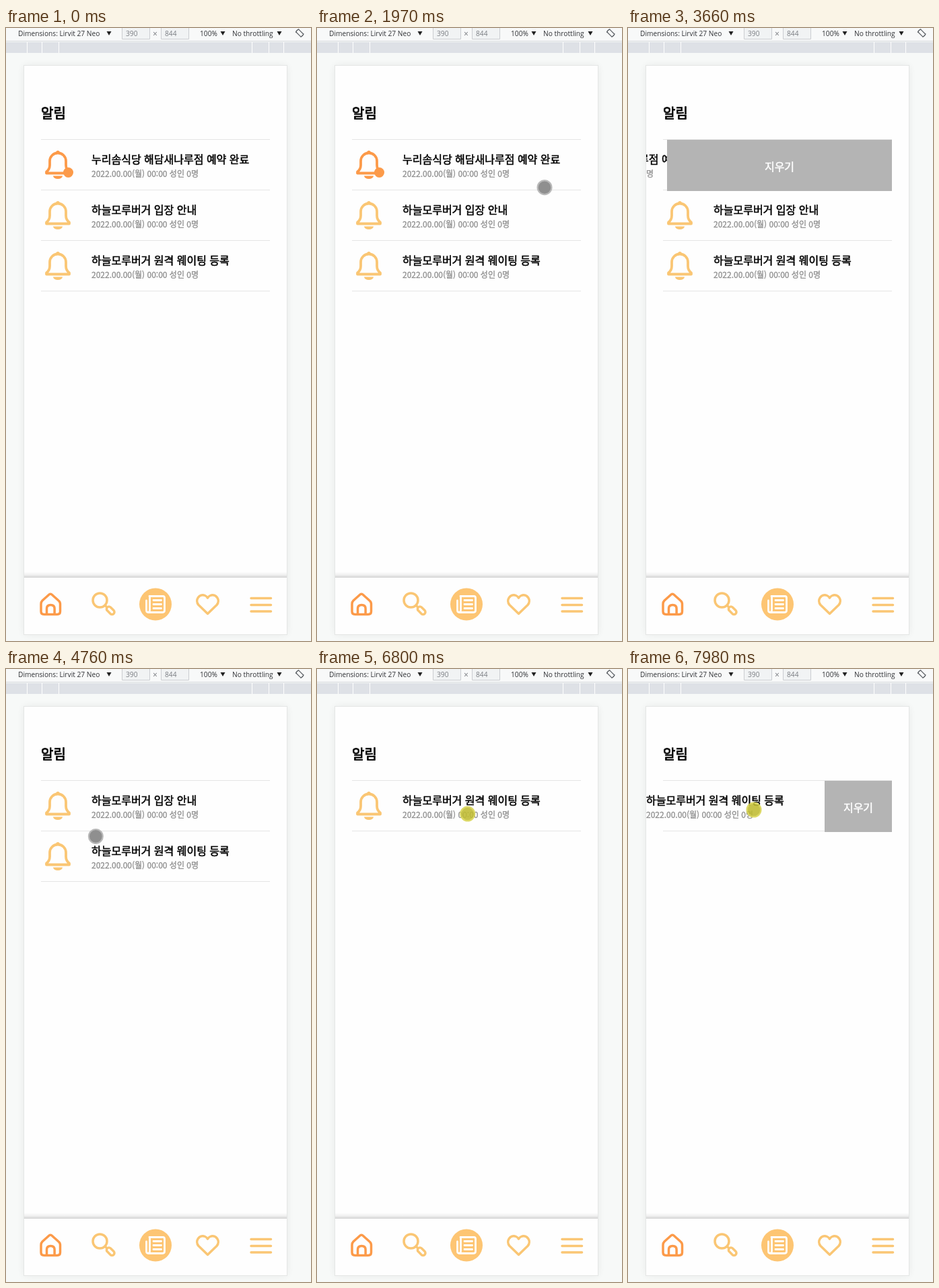
An HTML page for the animation above (8000 ms loop, 453 by 910 pixels).

```html
<!DOCTYPE html>
<html lang="ko">
<head>
<meta charset="utf-8">
<style>
  html, body { margin: 0; width: 100%; height: 100%; overflow: hidden; background: #f7f9f8; }
  svg { display: block; font-family: "Noto Sans CJK KR", "Noto Sans CJK", sans-serif; }
  .bar { font: 10.2px "Open Sans", "Noto Sans", sans-serif; fill: #303236; }
  .head, .title, .sub { stroke: currentColor; stroke-width: .5; fill: currentColor; }
  .head { font-size: 20px; stroke-width: .75; }
  .title { font-size: 16px; }
  .sub { font-size: 12px; color: #8e8e8e; stroke-width: .3; }
  .icon { fill: none; stroke: #fac674; stroke-width: 3.5; stroke-linecap: round; stroke-linejoin: round; }
</style>
</head>
<body>
<svg width="453" height="910" viewBox="0 0 453 910">
  <defs>
    <clipPath id="phone"><rect x="27" y="56" width="390" height="844"/></clipPath>
    <linearGradient id="shade" x2="0" y2="1">
      <stop offset="0" stop-opacity="0"/>
      <stop offset=".5" stop-opacity=".05"/>
      <stop offset="1" stop-opacity=".17"/>
    </linearGradient>
    <filter id="soft" x="-5%" y="-5%" width="110%" height="110%"><feGaussianBlur stdDeviation="6"/></filter>
    <g id="bell" fill="none" stroke="currentColor" stroke-width="3.8" stroke-linejoin="round">
      <path d="M60 215.500v-2c4-3 5-6 5-10v-6a12 12 0 0 1 24 0v6c0 4 1 7 5 10v2z"/>
      <path d="M70 219.500h14a7 4.500 0 0 1-14 0zM74 185.500a3 3.500 0 0 1 6 0z" fill="currentColor" stroke="none"/>
    </g>
  </defs>

  <rect width="453" height="20" fill="#f8f9f9"/>
  <path d="M0 19.500h453" stroke="#d5d8dc"/>
  <rect y="21" width="453" height="16" fill="#dee1e6"/>
  <path d="M31.500 21v16M53.500 21v16M78.500 21v16M365.500 21v16M390.500 21v16M412.500 21v16" stroke="#fff"/>
  <path d="M172.500-2h41v18.500h-41zM230.500-2h41v18.500h-41z" fill="#f1f3f4" stroke="#cbcdd1"/>
  <g class="bar">
    <text x="18" y="12">Dimensions: Lirvit 27 Neo</text>
    <text x="288" y="12">100%</text>
    <text x="336" y="12">No throttling</text>
    <g fill="#7b7e83"><text x="178" y="12">390</text><text x="218" y="13" font-size="12">×</text><text x="236" y="12">844</text></g>
  </g>
  <path d="M149.500 5h7l-3.500 6zM318.500 5h7l-3.500 6zM402.500 5h7l-3.500 6z" fill="#222"/>
  <g fill="none" stroke="#5f6368" stroke-width="1.200">
    <rect x="433.500" y="2" width="5.500" height="11" rx="1" transform="rotate(-45 436.200 7.500)"/>
    <path d="M430.500 7a6 6 0 0 1 5-5M442 8a6 6 0 0 1-5 5"/>
  </g>

  <rect x="27" y="56" width="390" height="844" opacity=".07" filter="url(#soft)"/>
  <rect x="26.500" y="55.500" width="391" height="845" fill="#fefefe" stroke="#e4e6e5"/>
  <text class="head" x="52" y="133.500">알림</text>
  <path d="M52 165.500h340" stroke="#e5e5e5"/>
  <g clip-path="url(#phone)">
    <g id="rows"></g>
    <rect id="erase" y="166" height="76" fill="#b4b4b4"/>
    <text id="label" class="title" y="212" color="#fff"></text>
  </g>

  <rect x="27" y="807" width="390" height="9" fill="url(#shade)"/>
  <rect x="27" y="816" width="390" height="84" fill="#fefefe"/>
  <g class="icon">
    <path d="M54 850 64 841q2-1.600 4 0l10 9q2.500 2 2.500 5v11q0 4.500-4.500 4.500H56.500q-4.500 0-4.500-4.500V855q0-3 2-5zM60.500 870v-8q0-5.500 5.800-5.500t5.800 5.500v8" stroke="#fc9a49"/>
    <circle cx="139.500" cy="849.500" r="10.500"/>
    <path d="M147 857l3 3"/>
    <rect x="148.500" y="861" width="13.500" height="7" rx="3.500" transform="rotate(45 155 864.500)"/>
    <circle cx="222" cy="855.500" r="24" fill="#fdc573" stroke="none"/>
    <g stroke="#fff" stroke-width="2.800">
      <path d="M213 843.500h20q2.500 0 2.500 2.500v18.500q0 3-3 3H211.500q-3 0-3-3V850M213.500 843.500V864q0 3.500-2.500 3.500"/>
      <path d="M219 849.500h11.500M219 855.500h11.500M219 861.500h11.500"/>
    </g>
    <path d="M299.500 869.500 286 856.500c-6-7 1-17.500 9.500-14q2.500 1 4 3.500 1.500-2.500 4-3.500c8.500-3.500 15.500 7 9.500 14z"/>
    <path d="M364 846.500h29.500M364 856.500h29.500M364 866h29.500"/>
  </g>
  <circle id="cursor" r="10.400" stroke-width="2.200"/>
</svg>
<script>
  const $ = id => document.getElementById(id);
  const titles = ['누리솜식당 해담새나루점 예약 완료', '하늘모루버거 입장 안내', '하늘모루버거 원격 웨이팅 등록'];
  $('rows').innerHTML = titles.map((title, i) => `<g>
    <path d="M52 240.500h340" stroke="#e5e5e5"/>
    <g>
      <use href="#bell" color="${i ? '#fac674' : '#fc9a49'}"/>
      ${i ? '' : '<circle cx="92.500" cy="214.500" r="7.500" fill="#fc9a49"/>'}
      <text class="title" x="127" y="201">${title}</text>
      <text class="sub" x="127" y="221">2022.00.00(월) 00:00 성인 0명</text>
    </g></g>`).join('');
  const rows = [...$('rows').children];

  const LOOP = 8000, OPEN = 100, FULL = 340, SLIDE = 300, REMOVE = 500;
  const RELEASE = 75;  // a row reacts this long before the stroke ends
  const LEAD = 24;     // the row moves this long before the grey panel

  // One visit of the pointer per row; a stroke is [end time, x, panel width wanted]
  const visits = [
    [[280, 330, 0], [1010, 99.5, OPEN], [1600, 338, 0], [1970, 338, 0],
     [2560, 122, OPEN], [3050, 335, OPEN], [3498, 11, FULL]],
    [[4200, 330, 0], [4860, 122, OPEN], [5150, 320, OPEN], [5568, 11, FULL]],
    [[6320, 114, 0], [7220, 312, 0], [7400, 122, OPEN], [7900, 122, OPEN], [7970, 187, OPEN], [LOOP, 187, OPEN]]
  ];
  const removedAt = visit => visit.at(-1)[2] === FULL ? visit.at(-1)[0] - RELEASE + REMOVE : Infinity;

  const clamp = p => Math.max(0, Math.min(1, p));
  const mix = (a, b, p) => a + (b - a) * p;
  const swing = p => (1 - Math.cos(Math.PI * p)) / 2;

  // cubic-bezier(.25, .1, .25, 1)
  function ease(p) {
    let lo = 0, hi = 1, s;
    for (let i = 0; i < 18; i++) {
      s = (lo + hi) / 2;
      if (.75 * s * (1 - s) + s ** 3 < p) lo = s; else hi = s;
    }
    return .3 * s * (1 - s) ** 2 + 3 * s * s * (1 - s) + s ** 3;
  }

  function slide(visit, t) {
    let width = 0, shift = 0, last = 0;
    for (const [end, , goal] of visit) {
      if (goal === last) continue;
      const age = t - end + RELEASE;
      width = mix(width, goal, ease(clamp(age / SLIDE)));
      shift = mix(shift, goal, goal === FULL ? clamp(age / 386) : ease(clamp((age + LEAD) / SLIDE)));
      last = goal;
    }
    return [Math.round(width), shift];
  }

  function pointer(t) {
    if (t >= 70 && t < 130) return [373.5, 838.5];
    const visit = visits.find(v => t >= v[0][0] && t < v.at(-1)[0] + RELEASE);
    if (!visit) return null;
    const i = visit.findIndex(stroke => stroke[0] > t);
    if (i < 0) return [visit.at(-1)[1], 260];
    const [t0, x0] = visit[i - 1], [t1, x1] = visit[i];
    const x = mix(x0, x1, swing((t - t0) / (t1 - t0)));
    if (visit === visits[2]) return [x, 215 - (t - 6800) / 197];
    const rise = 125 * (1 - swing(clamp((t - visit[0][0]) / 280)));
    return [x, 256 - .057 * x + rise];
  }

  function drawCursor(t) {
    const cursor = $('cursor'), at = pointer(t), late = t > 6000;
    cursor.style.display = at ? '' : 'none';
    if (!at) return;
    cursor.setAttribute('cx', at[0]);
    cursor.setAttribute('cy', at[1]);
    cursor.setAttribute('fill', late ? '#c0bc32' : '#8f8f8f');
    cursor.setAttribute('stroke', late ? '#d9d552' : '#b9b9b9');
    cursor.setAttribute('opacity', late ? .88 : 1);
  }

  function draw(t) {
    const gone = visits.filter(v => t >= removedAt(v)).length;
    const [width, shift] = slide(visits[gone], t);
    rows.forEach((row, i) => {
      row.style.display = i < gone ? 'none' : '';
      row.setAttribute('transform', `translate(0 ${(i - gone) * 75})`);
      row.lastElementChild.setAttribute('transform', `translate(${i === gone ? -shift : 0} 0)`);
    });
    $('erase').setAttribute('x', 392 - width);
    $('erase').setAttribute('width', width);
    const label = $('label'), fits = width >= 45;
    label.textContent = '지우기'.slice(0, Math.floor(width / 15));
    label.setAttribute('x', 392 - (fits ? width / 2 : width));
    label.setAttribute('text-anchor', fits ? 'middle' : 'start');
    drawCursor(t);
  }

  const begin = performance.now();
  function tick() {
    draw((performance.now() - begin) % LOOP);
    requestAnimationFrame(tick);
  }
  tick();
</script>
</body>
</html>
```
